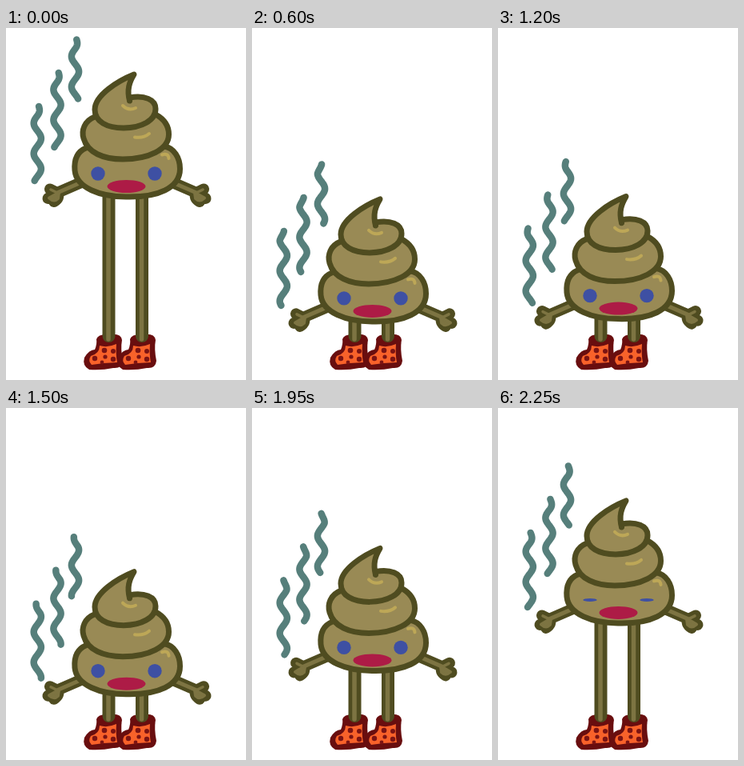
Recreate the animation shown at these times as an HTML page. Size 300 by 440 pixels, loop 2400 ms.

```html
<!DOCTYPE html>
<html lang="en">
<head>
<meta charset="utf-8">
<title>Long legs</title>
<style>
  html, body { margin: 0; width: 100%; height: 100%; overflow: hidden; background: #fff; }
  svg { display: block; width: 100vw; height: 100vh; }
  path { stroke-linecap: round; stroke-linejoin: round; fill: none; }
  .tier { fill: #998a55; stroke: #4f4c20; stroke-width: 7; }
  .dark { stroke: #4f4c20; }
  .light { stroke: #7d7442; }
  .shine { stroke: #bda757; stroke-width: 4; }
  .smoke { stroke: #567f7b; stroke-width: 8.5; }
</style>
</head>
<body>
<svg viewBox="0 0 300 440">
  <defs>
    <g id="arm">
      <path class="dark" stroke-width="14" d="M94 193 L64 206 L55 201.500 M64 206 Q60 212 52.500 213 M64 206 Q68 212 60 217"/>
      <path class="light" stroke-width="5" d="M94 193 L64 206"/>
      <path class="light" stroke-width="3.5" d="M64 206 L56 202"/>
      <path class="light" stroke-width="4" style="fill:#7d7442" d="M66 206 Q60 209 54 212.500 Q60 218 65 213Z"/>
    </g>
    <g id="boot">
      <path style="fill:#690e0f" d="M113 389 Q115 382 129 383 Q144 381 145 390 Q143 401 146 416 Q145 426 134 425 Q120 428 104 427 Q95 422 98 412 Q104 402 111 402 Q114 395 113 389Z"/>
      <path style="fill:#f8622a" d="M117 397 Q127 400 138 395 Q137 408 139 418 L122 419 L107 421 Q102 416 106 410 Q117 407 117 397Z"/>
      <g fill="#7c1413">
        <circle cx="123" cy="403" r="3.3"/>
        <circle cx="134" cy="404" r="3"/>
        <circle cx="111" cy="413" r="3.2"/>
        <circle cx="124" cy="411" r="2.6"/>
        <circle cx="134" cy="414" r="3.2"/>
        <circle cx="120" cy="418" r="2.4"/>
      </g>
    </g>
  </defs>

  <use href="#boot"/>
  <use href="#boot" x="42"/>
  <path id="legsDark" class="dark" stroke-width="16"/>
  <path id="legsLight" class="light" stroke-width="5.5"/>

  <g id="body">
    <path class="smoke"/>
    <path class="smoke"/>
    <path class="smoke"/>
    <use href="#arm"/>
    <use href="#arm" transform="translate(302 0) scale(-1 1)"/>
    <path class="tier" d="M100 150 C88 155 85 166 86 178 C88 200 118 211 150 211 C190 212 217.500 200 217.500 176 C217.500 162 210 150 198 148"/>
    <path class="tier" d="M111 111 C98 116 94 128 97 138 C102 156 122 164 146 164 C178 164 203.500 152 203.500 133 C203.500 122 198 114 187 108"/>
    <path class="tier" d="M154.500 91 L155 87 C173 84 187 89 187 101 C187 116 169 124.500 147 125 C126 125 111 117 111 102 C111 84 140 66 160 58 C154 68 151 77 154.500 91"/>
    <path class="shine" d="M146 97 Q153 104 162 100 M161 136.500 Q172 138 179 132 M195 158.500 Q203 156 203.500 163"/>
    <g fill="#3e50a3">
      <ellipse class="eye" cx="115" cy="182" rx="8.700"/>
      <ellipse class="eye" cx="186" cy="182" rx="8.700"/>
    </g>
    <ellipse cx="150.500" cy="198" rx="24" ry="8" fill="#ad1b46"/>
  </g>
</svg>
<script>
const STEP = 150, STEPS = 16, DROP = 156.5;
const BLINK = 15, WAVELENGTH = 38;
const $ = id => document.getElementById(id);
const eyes = document.querySelectorAll('.eye');
const plumes = document.querySelectorAll('.smoke');
const plumeShapes = [
  { x: 39.3, top: 98, length: 93 },
  { x: 64, top: 56, length: 93 },
  { x: 86.5, top: 14.5, length: 74 }
];

// A sine wave whose crests climb one wavelength per loop.
function wavyPath({ x, top, length }, crest) {
  const points = [];
  for (let y = 0; y <= length; y++) {
    const swing = 4.6 * Math.min(1, 0.4 + y / 20);
    const offset = swing * Math.cos((y - crest) / WAVELENGTH * 2 * Math.PI);
    points.push(`${(x + offset).toFixed(2)} ${top + y}`);
  }
  return 'M' + points.join('L');
}

function draw(now) {
  // Drops at once, then rises exponentially in held steps.
  const step = Math.floor(now / STEP) % STEPS || STEPS;
  const drop = step === STEPS ? 0 : DROP * (1 - 2 ** ((step - STEPS) * 2 / 3));
  const crest = 2 - WAVELENGTH * step / STEPS;

  $('body').setAttribute('transform', `translate(0 ${drop})`);
  const hip = 205 + drop;
  $('legsDark').setAttribute('d', `M128.500 ${hip}V385M170 ${hip}V385`);
  $('legsLight').setAttribute('d', `M128 ${hip}V389M169.500 ${hip}V389`);
  eyes.forEach(eye => eye.setAttribute('ry', step === BLINK ? 2 : 8.7));
  plumes.forEach((plume, i) => plume.setAttribute('d', wavyPath(plumeShapes[i], crest)));
}

const start = performance.now();
function loop() {
  draw(performance.now() - start);
  requestAnimationFrame(loop);
}
loop();
</script>
</body>
</html>
```
